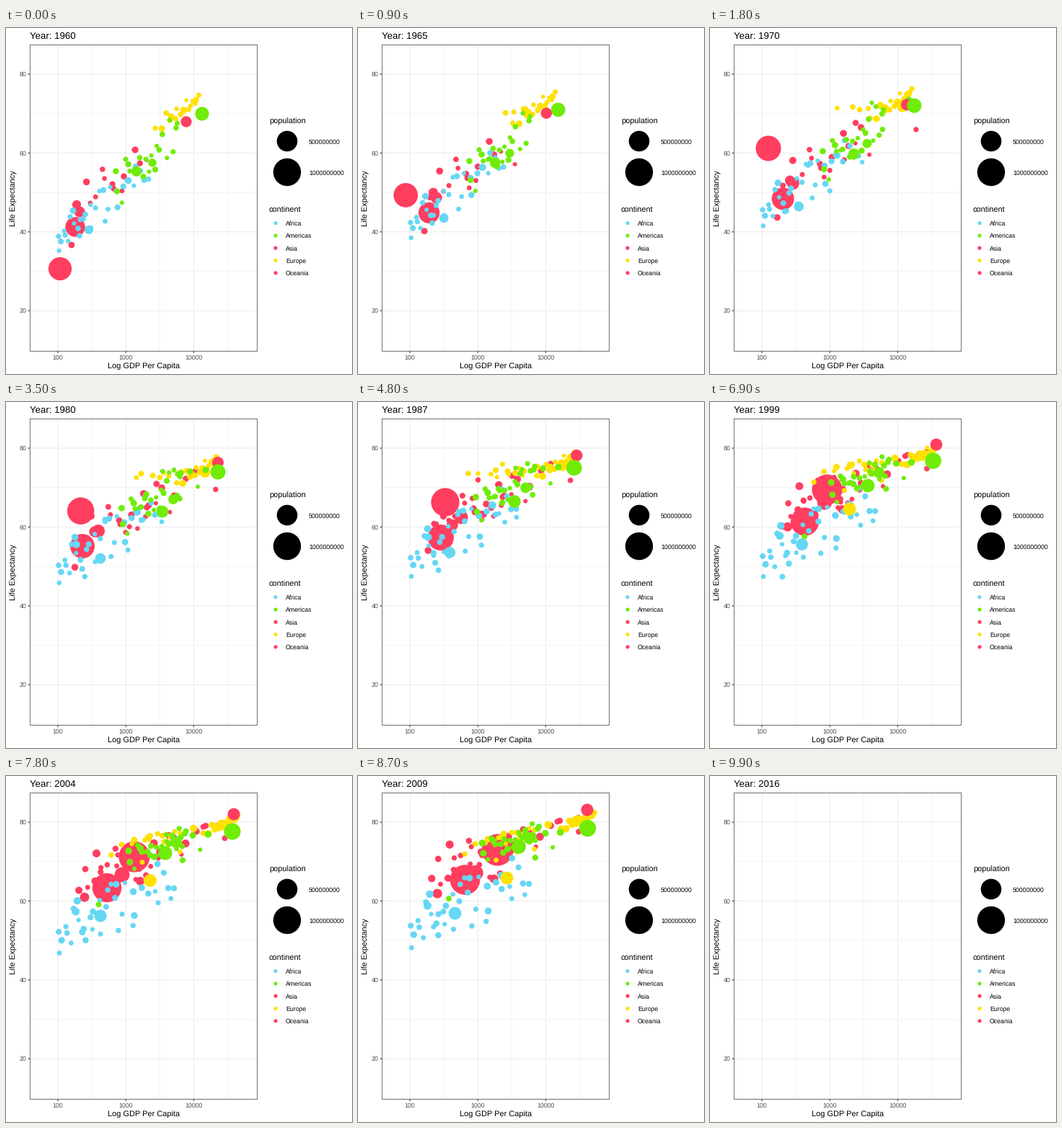
Recreate the animation shown at these times as a matplotlib script. Size 480 by 480 pixels, loop 10000 ms.

```python
import numpy as np
import matplotlib
import matplotlib.pyplot as plt
from matplotlib.animation import FuncAnimation
from matplotlib.patches import Circle, Rectangle

matplotlib.rcParams["font.family"] = "Liberation Sans"
matplotlib.rcParams["text.hinting"] = "none"

SIZE, DPI = 480, 72
FRAMES, STEP = 100, 100
DATA_END = 91          # the data run out before the last years
REF = 78               # time at which the end positions hold
KEYS = (0, 35, 60, REF)

COLORS = {"Africa": "#66d7f4", "Americas": "#70ec08", "Asia": "#ff3e60",
          "Europe": "#ffe100", "Oceania": "#ff3e60"}

rng = np.random.default_rng(11)
frames = np.arange(DATA_END)
progress = frames / REF
bubbles = []           # (continent, x, y, radius), each over all frames


def radius(millions):
    return 2.5 + 16.7 * np.sqrt(millions / 1000)


def add(cont, x, y, pop, growth, enter=0):
    size = radius(pop * (1 + (growth - 1) * progress))
    bubbles.append((cont, np.where(frames < enter, np.nan, x), y, size))


def track(cont, pop, growth, points, keys=KEYS):
    """A large bubble led through key points, going on past the last one."""
    def path(v):
        slope = (v[-1] - v[-2]) / (keys[-1] - keys[-2])
        beyond = np.maximum(frames - keys[-1], 0) * slope
        return np.interp(frames, keys, v) + beyond
    xs, ys = zip(*points)
    add(cont, path(xs), path(ys), pop, growth, keys[0])


def crowd(cont, n, start, end, spread, skew=1, bump=0, enter=(0, 0)):
    """Bubbles strewn along a line from poor to rich that moves over time.

    start and end hold the line as x0, y0, x1, y1; spread is the vertical
    scatter at both times, bump a rise of the line midway.
    """
    lift = bump * np.sin(np.pi * np.minimum(progress, 1))
    for i in range(n):
        rich = ((i + rng.uniform()) / n) ** skew
        off = np.clip(rng.normal(), -1.7, 1.7)

        def place(line, scatter):
            x0, y0, x1, y1 = line
            return (x0 + (x1 - x0) * rich,
                    y0 + (y1 - y0) * rich + off * scatter)

        xa, ya = place(start, spread[0])
        xb, yb = place(end, spread[1])
        pop = np.clip(rng.lognormal(1.7, 1), 0.6, 45)
        add(cont, xa + (xb - xa) * progress, ya + (yb - ya) * progress + lift,
            pop * 0.7, 1.8, rng.uniform(*enter))


track("Asia", 667, 1.94,
      [(75, 334), (58, 268), (81, 167), (121, 139), (147, 131), (178, 112)],
      (0, 4, 18, 48, 60, REF))
track("Asia", 450, 2.5, [(96, 276), (106, 200), (123, 177), (140, 155)])
track("Asia", 90, 2.5, [(102, 255), (128, 179), (157, 142), (161, 137)])
track("Asia", 47, 3.1, [(98, 245), (123, 180), (138, 162), (146, 152)])
crowd("Asia", 15, (90, 272, 200, 165), (100, 140, 230, 95), (22, 14), bump=-8)
crowd("Asia", 14, (150, 220, 290, 120), (185, 120, 312, 62), (22, 12),
      bump=-8, enter=(5, 35))
crowd("Asia", 12, (95, 180, 175, 150), (105, 145, 200, 130), (25, 18),
      enter=(36, 54))

track("Africa", 45, 3, [(115, 280), (131, 217), (124, 201), (131, 194)])
crowd("Africa", 31, (72, 285, 200, 205), (72, 210, 236, 150), (22, 32),
      skew=1.3, bump=-30)
crowd("Africa", 9, (85, 280, 215, 230), (80, 210, 240, 190), (22, 28),
      bump=-30, enter=(10, 45))
# one year of sudden collapse
track("Africa", 3, 3, [(103, 266), (112, 232), (103, 262), (83, 429), (96, 262), (106, 217)],
      (0, 50, 58, 60, 62, REF))

crowd("Europe", 17, (200, 137, 268, 98), (268, 78, 322, 58), (7, 4), skew=0.6)
crowd("Europe", 7, (165, 130, 230, 110), (185, 100, 262, 66), (8, 6), enter=(0, 35))
crowd("Europe", 14, (115, 130, 215, 115), (130, 118, 245, 88), (14, 10),
      skew=0.6, enter=(44, 54))
track("Europe", 70, 1.15, [(266, 111), (299, 68)], (16, REF))
track("Europe", 148, 1, [(206, 134), (187, 152), (200, 145)], (51, 60, REF))

track("Americas", 72, 2.5, [(181, 199), (217, 152), (217, 125), (221, 107)])
track("Americas", 38, 2.8, [(203, 187), (232, 135), (233, 104), (236, 92)])
crowd("Americas", 22, (150, 232, 240, 142), (168, 122, 252, 82), (20, 11), bump=-9)
crowd("Americas", 8, (190, 140, 285, 115), (200, 108, 290, 90), (16, 14),
      enter=(10, 34))
track("Americas", 8, 1, [(133, 193), (126, 170), (123, 325), (126, 174)],
      (62, 87, 88, 90))

track("Asia", 93, 1.37, [(250, 130), (294, 84), (312, 65), (316, 53)])
track("Americas", 181, 1.62, [(272, 119), (294, 97), (305, 86), (314, 77)])

fig = plt.figure(figsize=(SIZE / DPI, SIZE / DPI), dpi=DPI, facecolor="white")
ax = fig.add_axes([0, 0, 1, 1])
ax.set_xlim(0, SIZE)
ax.set_ylim(SIZE, 0)
ax.axis("off")

LEFT, RIGHT, TOP, BOTTOM = 33.3, 348.6, 23.4, 448.3


def text(x, y, s, size=8.8, color="black", **kw):
    return ax.text(x, y, s, fontsize=size, color=color, **kw)


def line(xs, ys, color="#ebebeb", width=1.07):
    ax.plot(xs, ys, color=color, lw=width, zorder=1, snap=False,
            solid_capstyle="butt")


for i in range(3):
    x = 72 + 94.2 * i
    line([x, x], [TOP, BOTTOM])
    line([x + 47.1] * 2, [TOP, BOTTOM], width=0.53)
    line([x, x], [BOTTOM, BOTTOM + 2.75], "#333333")
    text(x, 460.3, str(10 ** (i + 2)), color="#4d4d4d", ha="center")
for i in range(4):
    y = 64 + 109.4 * i
    line([LEFT, RIGHT], [y, y])
    line([LEFT, RIGHT], [y + 54.7] * 2, width=0.53)
    line([LEFT - 2.75, LEFT], [y, y], "#333333")
    text(28.3, y + 3.2, str(80 - 20 * i), color="#4d4d4d", ha="right")
ax.add_patch(Rectangle((LEFT, TOP), RIGHT - LEFT, BOTTOM - TOP, fill=False,
                       ec="#333333", lw=0.7, zorder=4, snap=False))

text(191, 472.8, "Log GDP Per Capita", 11, ha="center")
text(10.8, 236, "Life Expectancy", 11, rotation=90, ha="center", va="center")
title = text(33, 15, "Year: 1960", 13.2)

text(365, 133, "population", 11)
for y, pop in ((157, 500), (200, 1000)):
    ax.add_patch(Circle((390, y), radius(pop), color="black", lw=0))
    text(420, y + 3.6, f"{pop}000000")
text(365, 256, "continent", 11)
for i, (name, color) in enumerate(COLORS.items()):
    y = 270.7 + 17.28 * i
    ax.add_patch(Circle((374, y), 2.6, color=color, lw=0))
    text(388, y + 3.3, name)

xs, ys, rs = (np.array([b[i] for b in bubbles]) for i in (1, 2, 3))
colors = np.array([COLORS[b[0]] for b in bubbles])
dots = ax.scatter([], [], linewidths=0, zorder=3)


def update(k):
    title.set_text(f"Year: {round(1960 + 56 * k / (FRAMES - 1))}")
    dots.set_visible(k < DATA_END)
    if k < DATA_END:
        on = ~np.isnan(xs[:, k])
        dots.set_offsets(np.column_stack([xs[on, k], ys[on, k]]))
        dots.set_sizes((2 * rs[on, k]) ** 2)
        dots.set_facecolors(colors[on])
    return title, dots


anim = FuncAnimation(fig, update, frames=FRAMES, interval=STEP, repeat=True,
                     repeat_delay=0, blit=False)
plt.show()
```
